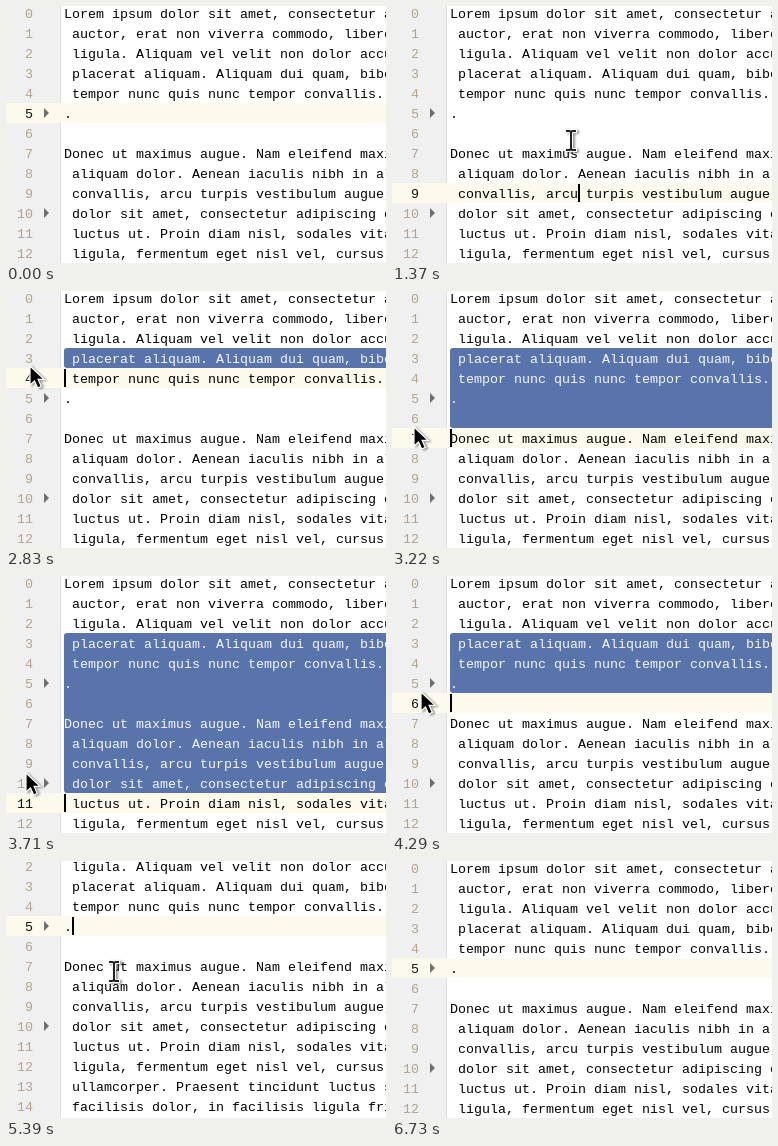
Animation of 380 by 257 pixels, one loop 6.76 s. Source, as an HTML page:

```html
<!DOCTYPE html>
<html lang="la">
<head>
<meta charset="utf-8">
<title>Gutter selection</title>
<style>
  html, body { margin: 0; width: 100%; height: 100%; overflow: hidden; background: #fff; }
  #stage { position: relative; width: 380px; height: 257px; overflow: hidden; background: #fff;
    font: 13.333px/24px "Courier New", "Liberation Mono", monospace; color: #000; }
  #stage div { position: absolute; }
  #gutter { left: 0; top: 0; width: 54px; height: 257px; background: #f0f0f0; border-right: 1px solid #dedede; }
  #view { left: 0; top: -3px; width: 380px; height: 400px; }
  #band { left: 0; width: 380px; height: 20px; background: #fcfaed; }
  #sel { left: 58px; width: 340px; background: #5974ab; border-radius: 3px; }
  .row { left: 0; width: 380px; height: 20px; white-space: pre; }
  .num { left: 0; width: 27px; text-align: right; color: #b3a48e; }
  .text { left: 58px; }
  .now .num { color: #111; }
  .picked .text { color: #f4f6fa; }
  .fold { left: 38px; top: 5px; border: solid transparent; border-width: 5px 0 5px 5px; border-left-color: #6e6e6e; }
  #caret { width: 2px; height: 18px; background: #000; }
  svg { position: absolute; left: 0; top: 0; overflow: visible; filter: drop-shadow(2px 1px 1px #0006); }
</style>
</head>
<body>
<div id="stage">
  <div id="gutter"></div>
  <div id="view">
    <div id="band"></div>
    <div id="sel"></div>
  </div>
  <svg id="mouse" width="1" height="1">
    <defs><path id="bar" d="M-4-10h2q2 0 2 2V7q0 2-2 2h-2M4-10H2q-2 0-2 2M4 9H2q-2 0-2-2"/></defs>
    <g id="beam" fill="none" stroke-linecap="square">
      <use href="#bar" stroke="#fff" stroke-width="4"/>
      <use href="#bar" stroke="#222" stroke-width="2"/>
    </g>
    <path id="arrow" d="M0 0v19l4.5-4 3.2 7 3.6-1.6-3.2-7h6z" stroke="#fff" stroke-width="1.2"/>
  </svg>
</div>
<script>
const LOOP = 6760, ROW = 20, CHAR = 8, LEFT = 58, FIRST = 3;
const $ = id => document.getElementById(id);
const clamp = (v, lo, hi) => Math.min(hi, Math.max(lo, v));
const ease = k => k * k * (3 - 2 * k);

const lines = [
  'Lorem ipsum dolor sit amet, consectetur adipiscing',
  ' auctor, erat non viverra commodo, libero',
  ' ligula. Aliquam vel velit non dolor accumsan',
  ' placerat aliquam. Aliquam dui quam, bibendum',
  ' tempor nunc quis nunc tempor convallis.',
  '.',
  '',
  'Donec ut maximus augue. Nam eleifend maximus',
  ' aliquam dolor. Aenean iaculis nibh in aliquet',
  ' convallis, arcu turpis vestibulum augue, libero',
  ' dolor sit amet, consectetur adipiscing elit',
  ' luctus ut. Proin diam nisl, sodales vitae',
  ' ligula, fermentum eget nisl vel, cursus',
  ' ullamcorper. Praesent tincidunt luctus sem',
  ' facilisis dolor, in facilisis ligula fringilla',
  ' mattis. Vivamus sed ipsum non sapien dapibus',
  ' pretium vel in arcu. Integer at lorem nisi',
  ' viverra.'
];

const enter = { x: 248, y: 270 };
const moves = [
  { from: 150, to: 530, x: 195, y: 136 },
  { from: 930, to: 1140, x: 187, y: 183 },
  { from: 1140, to: 1610, x: 170, y: 84 },
  { from: 1870, to: 2290, x: 24, y: 69 },
  { from: 2700, to: 3710, x: 20, y: 197 },
  { from: 3740, to: 4410, x: 30, y: 109 },
  { from: 4430, to: 4570, x: 108, y: 111 },
  { from: 6100, to: 6330, x: 190, y: 270 }
];
const clicks = [730, 1140, 1680, 4570];
const dragStart = 2360, dragEnd = 4500;

// each move eases from wherever the previous one ended
function mouseAt(t) {
  let { x, y } = enter;
  for (const m of moves) {
    const k = ease(clamp((t - m.from) / (m.to - m.from), 0, 1));
    x += (m.x - x) * k;
    y += (m.y - y) * k;
  }
  return { x: Math.round(x), y: Math.round(y) };
}

const rowAt = y => Math.floor((y + 3) / ROW);

// a click puts the caret at the nearest character of the row under the pointer
function caretAt(t) {
  const click = clicks.filter(c => c <= t).pop() ?? clicks[clicks.length - 1];
  const { x, y } = mouseAt(click), row = rowAt(y);
  return { row, col: clamp(Math.round((x - LEFT) / CHAR), 0, lines[row].length) };
}

function scrollAt(t) {
  const notches = (start, gap, max) => clamp(Math.floor((t - start) / gap) + 1, 0, max);
  return t < 5560 ? 21 * (notches(4800, 76, 4) - notches(5260, 130, 2)) : 0;
}

const caretOn = t => t >= clicks[0] && (t < 5920 || Math.floor((t - 5920) / 202) % 2 === 1);

function add(parent, cls, text = '') {
  const el = document.createElement('div');
  el.className = cls;
  el.textContent = text;
  parent.append(el);
  return el;
}

const rows = lines.map((text, i) => {
  const row = add($('view'), 'row');
  row.style.top = i * ROW + 'px';
  add(row, 'num', i);
  add(row, 'text', text);
  if (i === 5 || i === 10) add(row, 'fold');
  return row;
});
add($('view'), '').id = 'caret';

function draw(t) {
  const { x, y } = mouseAt(t);
  const dragging = t >= dragStart && t < dragEnd;
  const end = dragging ? rowAt(y) : FIRST - 1;
  const { row, col } = dragging ? { row: end + 1, col: 0 } : caretAt(t);

  $('view').style.transform = `translateY(${-scrollAt(t)}px)`;
  $('band').style.top = row * ROW + 'px';
  $('sel').style.top = FIRST * ROW + 'px';
  $('sel').style.height = (end - FIRST + 1) * ROW + 'px';
  $('caret').style.left = LEFT + col * CHAR + 'px';
  $('caret').style.top = row * ROW + 1 + 'px';
  $('caret').style.visibility = caretOn(t) ? 'visible' : 'hidden';
  rows.forEach((el, i) => {
    el.classList.toggle('now', i === row);
    el.classList.toggle('picked', i >= FIRST && i <= end);
  });

  $('mouse').style.transform = `translate(${x}px, ${y}px)`;
  $('beam').style.display = x >= LEFT ? '' : 'none';
  $('arrow').style.display = x < LEFT ? '' : 'none';
}

const start = performance.now();
function tick() {
  draw((performance.now() - start) % LOOP);
  requestAnimationFrame(tick);
}
tick();
</script>
</body>
</html>
```
